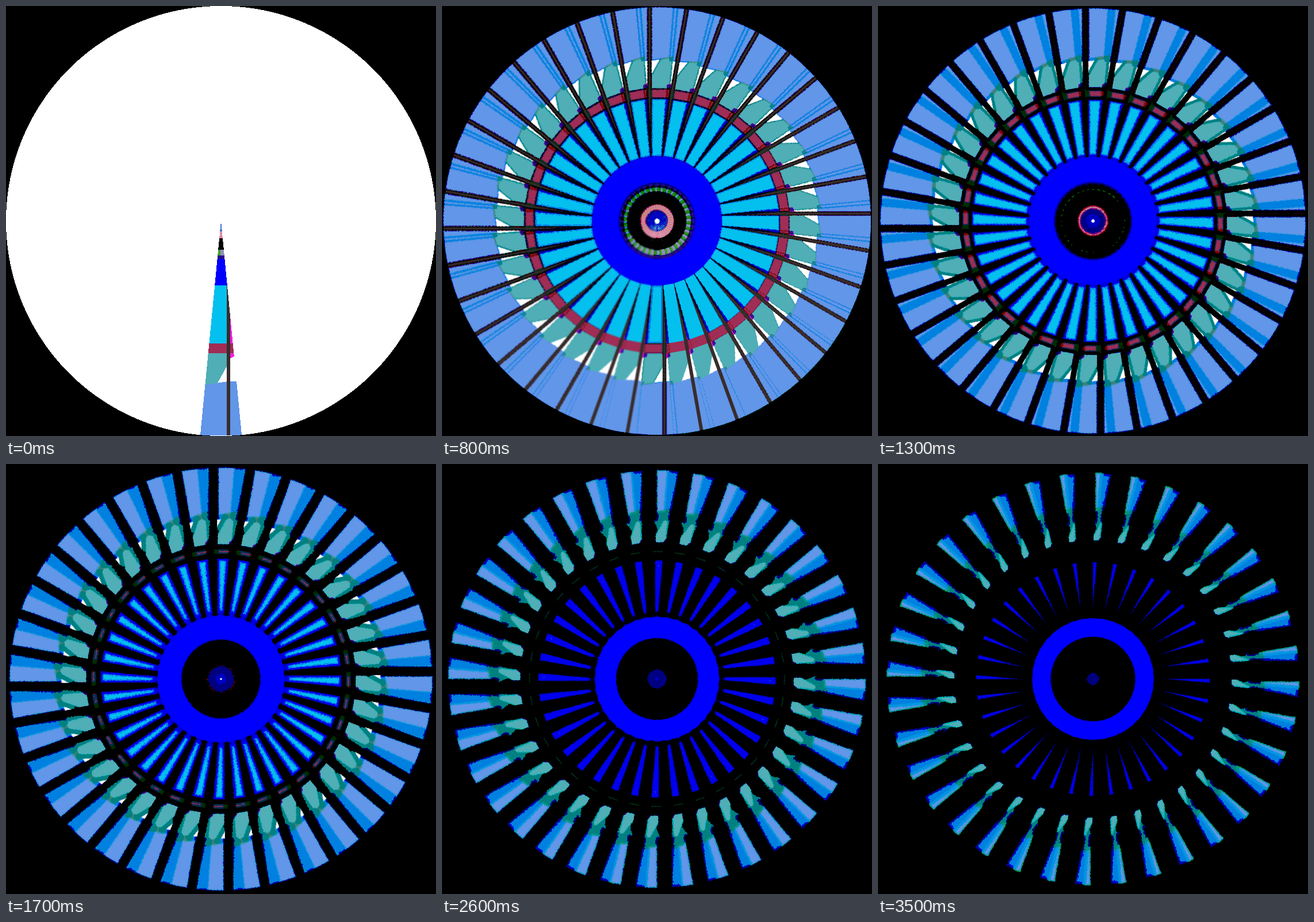
An HTML page with a canvas that plays this animation: 748x748 px, repeating every 3600 ms.

```html
<!DOCTYPE html>
<html lang="en">
<head>
<meta charset="utf-8">
<title>Wheel</title>
<style>
  html, body { margin: 0; width: 100%; height: 100%; overflow: hidden; background: #000; }
  canvas { display: block; width: 748px; height: 748px; }
</style>
</head>
<body>
<canvas id="stage" width="748" height="748"></canvas>
<script>
const SIZE = 748, MID = SIZE / 2, STEP = 100, COUNT = 36;
const ctx = document.getElementById('stage').getContext('2d');

const WHITE = 0xffffff, BLACK = 0, SPOKE = 0x382c2c, CRIMSON = 0xa02d55,
  MAGENTA = 0xf01edc, TEAL = 0x4faeb6, SKY = 0x6296e8;

// Bands of the wedge: lower edge, colour
const BANDS = [
  [392, 0x3c78c8], [404, 0xdc8ea8], [424, BLACK], [434, 0x9090b8],
  [440, 0x280a8a], [486, 0x0000ff], [587, 0x04c0ee], [604, CRIMSON]
];

function wedgeColour(x, y) {
  if (y > 653 + Math.max(0, 386 - x) * 0.15) return x >= 384 && x < 390 ? SPOKE : SKY;
  if (y > 486) {
    if (x >= 384 && x < 390) return SPOKE;
    if (x >= 390 && (y < 587 || y > 604)) {
      return y < 613 - (x - 390) * 0.5 ? MAGENTA : WHITE;
    }
  }
  if (y > 604) return x < 368 + (656 - y) * 0.55 ? TEAL : WHITE;
  if (y > 424 && y < 434 && x < 373) return 0x40a030;
  return BANDS.find(band => y < band[0])[1];
}

function colourAt(x, y) {
  const dx = x - MID, dy = y - MID;
  if (dx * dx + dy * dy > MID * MID) return BLACK;
  if (y < 379 || y > 746.5 || Math.abs(dx) > dy * 0.0968) return WHITE;
  return wedgeColour(x, y);
}

function firstPicture() {
  const image = new ImageData(SIZE, SIZE);
  for (let y = 0, p = 0; y < SIZE; y++) {
    for (let x = 0; x < SIZE; x++, p += 4) {
      const c = colourAt(x + 0.5, y + 0.5);
      image.data[p] = c >> 16;
      image.data[p + 1] = c >> 8 & 255;
      image.data[p + 2] = c & 255;
      image.data[p + 3] = 255;
    }
  }
  return image;
}

const tidy = v => Math.round(v * 1e12) / 1e12;
const clamp = v => v < 0 ? 0 : v > SIZE - 1 ? SIZE - 1 : v;

// Bitwise AND of a picture with itself, turned counterclockwise with bilinear sampling
function combine(from, degrees) {
  const a = degrees * Math.PI / 180, cos = tidy(Math.cos(a)), sin = tidy(Math.sin(a));
  const src = from.data, image = new ImageData(new Uint8ClampedArray(src), SIZE, SIZE);
  const out = image.data;
  const src32 = new Uint32Array(src.buffer), out32 = new Uint32Array(out.buffer);
  const empty = src32[0];
  for (let y = 0; y < SIZE; y++) {
    const dy = y + 0.5 - MID;
    for (let x = 0; x < SIZE; x++) {
      const p = y * SIZE + x;
      if (src32[p] === empty) continue;
      const dx = x + 0.5 - MID;
      const sx = clamp(dx * cos - dy * sin + MID - 0.5);
      const sy = clamp(dx * sin + dy * cos + MID - 0.5);
      const x0 = Math.floor(sx), y0 = Math.floor(sy), fx = sx - x0, fy = sy - y0;
      const right = x0 < SIZE - 1 ? 1 : 0, down = y0 < SIZE - 1 ? SIZE : 0;
      const i = y0 * SIZE + x0, j = i + right, k = i + down, l = k + right;
      const c = src32[i];
      if (c === src32[j] && c === src32[k] && c === src32[l]) {
        out32[p] &= c;
        continue;
      }
      for (let n = 0; n < 3; n++) {
        const top = src[i * 4 + n] + (src[j * 4 + n] - src[i * 4 + n]) * fx;
        const low = src[k * 4 + n] + (src[l * 4 + n] - src[k * 4 + n]) * fx;
        out[p * 4 + n] &= Math.round(top + (low - top) * fy);
      }
    }
  }
  return image;
}

const pictures = [firstPicture()];

// The turn grows by ten degrees with every step
function picture(n) {
  while (pictures.length <= n) {
    const i = pictures.length;
    pictures.push(combine(pictures[i - 1], i * 10));
  }
  return pictures[n];
}

const start = performance.now();
let shown = -1;

function draw() {
  const n = Math.floor((performance.now() - start) / STEP) % COUNT;
  if (n !== shown) {
    ctx.putImageData(picture(n), 0, 0);
    shown = n;
  }
  requestAnimationFrame(draw);
}
draw();
</script>
</body>
</html>
```
